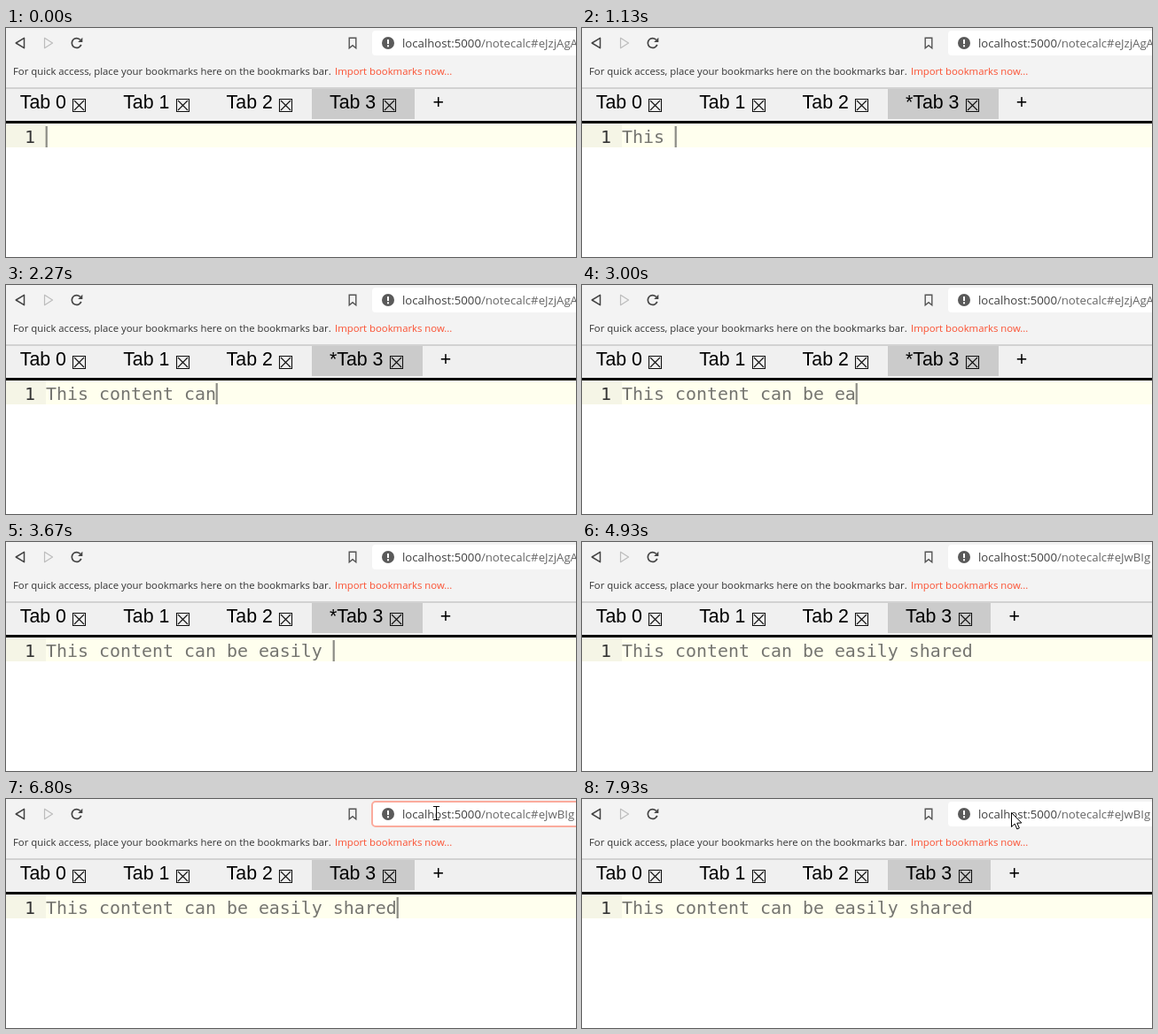
Recreate the animation shown at these times as an HTML page with a canvas. Size 643 px wide and 259 px high, loop 8 s.

```html
<!DOCTYPE html>
<html lang="en">
<head>
<meta charset="utf-8">
<title>Shared note</title>
<style>
html, body { margin: 0; width: 643px; height: 259px; overflow: hidden; background: #fff; }
canvas { display: block; width: 643px; height: 259px; }
</style>
</head>
<body>
<canvas id="stage"></canvas>
<script>
const W = 643, H = 259, LOOP = 8000, TICK = 1000 / 15;
const canvas = document.getElementById('stage');
const ratio = window.devicePixelRatio || 1;
canvas.width = Math.round(W * ratio);
canvas.height = Math.round(H * ratio);
const c = canvas.getContext('2d');

const UI = '"Open Sans", "Noto Sans", sans-serif';
const TAB = '21.33px "Liberation Sans", Arial, sans-serif';
const MONO = '19.93px "DejaVu Sans Mono", "Noto Sans Mono", monospace';

const NOTE = 'This content can be easily shared';
// Ticks (1/15 s) at which each character is typed
const KEYS = [8, 12, 15, 16, 17, 18, 20, 22, 23, 26, 27, 29, 30, 32, 33, 34, 36, 37,
  39, 40, 43, 44, 46, 50, 53, 54, 55, 57, 59, 60, 62, 64, 66];
const BLINKS = [74, 81, 89, 97, 104, 111, 119];
const SAVED = 74, ENTER = 84, TURN = 96, ARRIVE = 101, FOCUS = 102, BLUR = 110;

const passed = (list, k) => list.filter(t => t <= k).length;
const mix = (a, b, u) => a + (b - a) * u;

function rect(x, y, w, h, color) {
  c.fillStyle = color;
  c.fillRect(x, y, w, h);
}

function text(str, x, y, font, color) {
  c.font = font;
  c.fillStyle = color;
  c.fillText(str, x, y);
  return x + c.measureText(str).width;
}

function poly(points) {
  c.beginPath();
  points.forEach(([x, y]) => c.lineTo(x, y));
  c.closePath();
}

function stroke(color, width) {
  c.strokeStyle = color;
  c.lineWidth = width;
  c.stroke();
}

function drawNavIcons() {
  c.lineJoin = 'round';
  poly([[11.2, 17], [20.5, 11.3], [20.5, 22.7]]);
  stroke('#444', 1.5);
  poly([[52.5, 17], [43.5, 11.3], [43.5, 22.7]]);
  stroke('#bcbcbc', 1.2);

  c.beginPath();
  c.arc(79.7, 17, 5.4, 0.35, Math.PI * 2 - 0.75);
  stroke('#444', 1.7);
  poly([[86.3, 10.8], [86.3, 16], [81.2, 16]]);
  c.fillStyle = '#444';
  c.fill();

  c.lineJoin = 'miter';
  poly([[387.2, 11.2], [394.8, 11.2], [394.8, 22.8], [391, 19.6], [387.2, 22.8]]);
  stroke('#555', 1.4);
}

function drawAddress(k) {
  c.beginPath();
  c.roundRect(413, 3, 260, 28, 4);
  c.fillStyle = '#fff';
  c.fill();
  if (k >= FOCUS && k < BLUR) stroke('#fbab9d', 2);

  c.beginPath();
  c.arc(431, 17, 7, 0, Math.PI * 2);
  c.fillStyle = '#5a5a5a';
  c.fill();
  rect(430, 13, 2, 5, '#fff');
  rect(430, 19.3, 2, 2, '#fff');

  const hash = k < SAVED ? 'eJzjAgA' : 'eJwBIg';
  const font = '13.2px ' + UI;
  const x = text('localhost:5000', 447, 22, font, '#404040');
  text('/notecalc#' + hash, x, 22, font, '#666');
}

function drawBrowser(k) {
  rect(0, 0, W, 67, '#f3f3f3');
  drawNavIcons();
  drawAddress(k);
  const font = '11.33px ' + UI;
  text('For quick access, place your bookmarks here on the bookmarks bar.', 8, 53, font, '#333');
  text('Import bookmarks now...', 371, 53, font, '#fb4f30');
  rect(0, 67, W, 2, '#d2d2d2');
}

function drawCloseBox(x) {
  x = Math.round(x) + 0.5;
  c.beginPath();
  c.rect(x, 80.5, 14, 14);
  c.moveTo(x + 1.5, 82);
  c.lineTo(x + 12.5, 93);
  c.moveTo(x + 12.5, 82);
  c.lineTo(x + 1.5, 93);
  stroke('#111', 1.1);
}

function drawTabs(edited) {
  const pitch = 116.4, extra = edited ? 8.3 : 0;
  rect(0, 69, W, 36, '#f0f0f0');
  rect(345, 69, Math.round(pitch + extra), 34, '#cbcbcb');
  for (let i = 0; i < 4; i++) {
    const x = 15.8 + i * pitch, active = i === 3;
    text((active && edited ? '*' : '') + 'Tab ' + i, x, 91, TAB, '#000');
    drawCloseBox(x + 59.6 + (active ? extra : 0));
  }
  text('+', 481.4 + extra, 91, TAB, '#000');
  rect(0, 105, W, 3, '#000');
}

function drawEditor(k, typed) {
  rect(0, 108, W, H - 108, '#fff');
  rect(0, 108, 45, 27, '#f5f5e6');
  rect(45, 108, W - 45, 27, '#ffffee');
  text('1', 21, 130, MONO, '#333');
  text(NOTE.slice(0, typed), 45, 130, MONO, '#757570');
  if (passed(BLINKS, k) % 2 === 0) rect(44.6 + typed * 12, 111, 2.2, 24, '#8c8c86');
}

function drawArrow(x, y) {
  c.save();
  c.translate(x, y);
  poly([[0, 0], [0, 16], [3.7, 12.6], [6.3, 18.5], [8.8, 17.4], [6.3, 11.7], [11.3, 11.5]]);
  c.fillStyle = '#fff';
  c.fill();
  stroke('#000', 1);
  c.restore();
}

function drawBeam(x, y) {
  const bars = (pad, color) => {
    rect(x - 0.5 - pad, y - 8 - pad, 1 + pad * 2, 16 + pad * 2, color);
    for (const end of [-8, 7]) rect(x - 3.5 - pad, y + end - pad, 7 + pad * 2, 1 + pad * 2, color);
  };
  bars(0.6, '#fff');
  bars(0, '#000');
}

function drawPointer(k) {
  if (k < ENTER) return;
  let x, y;
  if (k <= TURN) {
    const u = Math.pow((k - ENTER) / (TURN - ENTER), 1.2);
    x = mix(141, 364, u);
    y = mix(250, 119, u);
  } else {
    const u = Math.sin(Math.min(1, (k - TURN) / (ARRIVE - TURN)) * Math.PI / 2);
    x = mix(364, 484.5, u);
    y = mix(119, 15, u);
  }
  if (y < 31 && x > 413 && k < BLUR) drawBeam(Math.round(x) + 0.5, Math.round(y) + 1);
  else drawArrow(Math.floor(x) + 0.5, Math.round(y) + 0.5);
}

function draw(ms) {
  const k = Math.floor((ms % LOOP + 4) / TICK) % 120;
  const typed = passed(KEYS, k);
  c.setTransform(ratio, 0, 0, ratio, 0, 0);
  drawBrowser(k);
  drawTabs(typed > 0 && k < SAVED);
  drawEditor(k, typed);
  drawPointer(k);
}

const start = performance.now();
function frame() {
  draw(performance.now() - start);
  requestAnimationFrame(frame);
}
frame();
</script>
</body>
</html>
```
